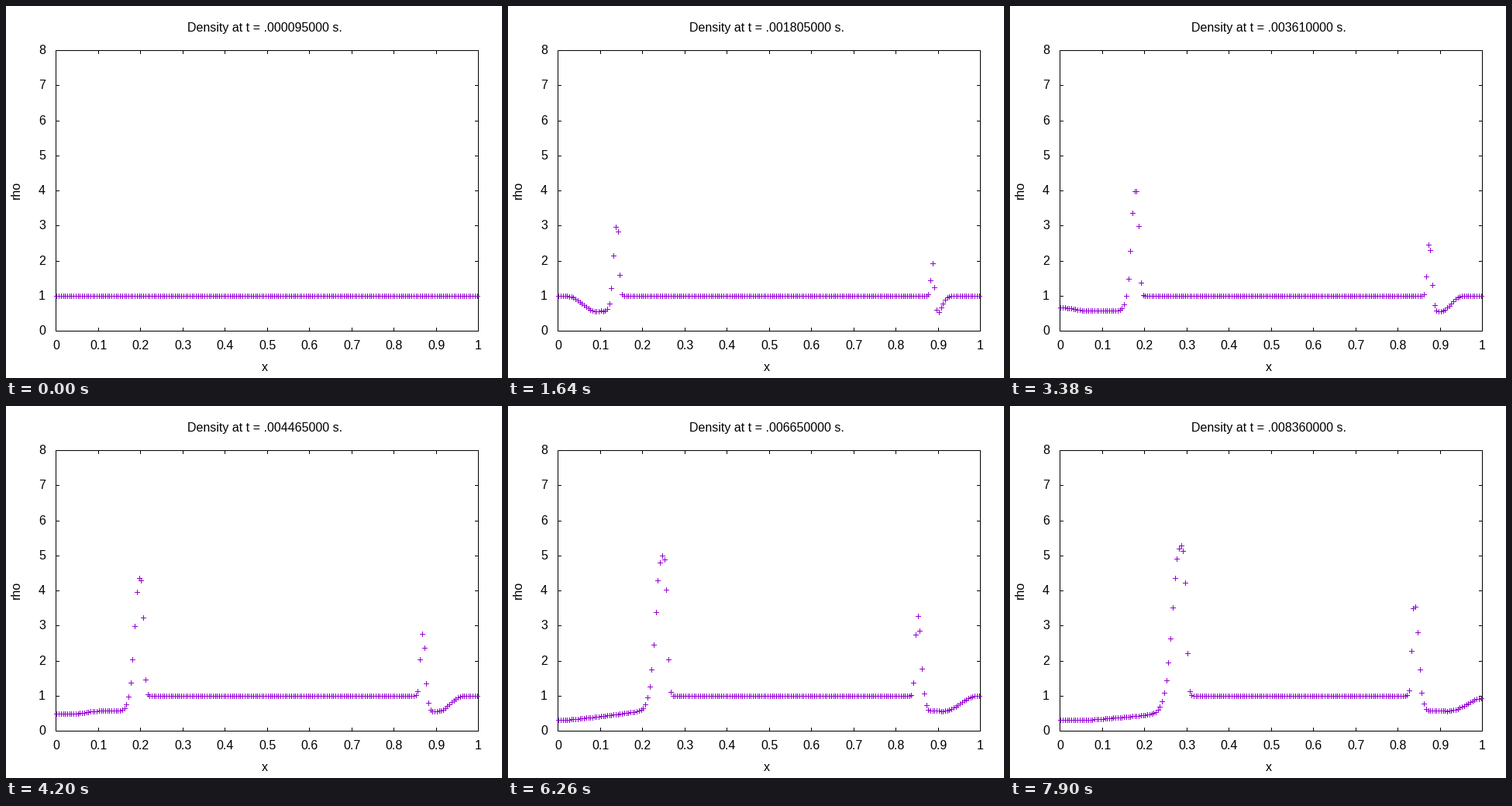
Recreate the animation shown at these times as a matplotlib script. Size 640 by 480 pixels, loop 8000 ms.

```python
import numpy as np
import matplotlib.pyplot as plt
from matplotlib.animation import FuncAnimation
from matplotlib.collections import LineCollection

W, H, DPI = 640, 480, 100
PX = 72 / DPI                       # one pixel in points
LEFT, RIGHT, TOP, BOTTOM = 64, 609, 57, 419
PURPLE = "#9400d3"

# Interacting blast waves: 1D Euler equations between two walls
N, GAMMA = 200, 1.4
DT, SUBSTEPS, STATES = 9.5e-5, 4, 88
DX = 1 / N
X = (np.arange(N) + 0.5) * DX


def conserved(w):
    rho, u, p = w
    return np.array([rho, rho * u, p / (GAMMA - 1) + 0.5 * rho * u * u])


def primitive(q):
    rho, m, e = q
    u = m / rho
    return np.array([rho, u, np.maximum((GAMMA - 1) * (e - 0.5 * m * u), 1e-6)])


def flux(w, q):
    rho, u, p = w
    return np.array([q[1], q[1] * u + p, (q[2] + p) * u])


def minmod(a, b):
    return np.where(a * b > 0, np.sign(a) * np.minimum(abs(a), abs(b)), 0)


def star_flux(w, s, sm):
    """Flux next to the contact wave sm, behind the outer wave s."""
    rho, u, p = w
    q = conserved(w)
    k = rho * (s - u) / (s - sm)
    e = q[2] / rho + (sm - u) * (sm + p / (rho * (s - u)))
    return flux(w, q) + s * (np.array([k, k * sm, k * e]) - q)


def hllc(wl, wr):
    (rl, ul, pl), (rr, ur, pr) = wl, wr
    cl, cr = np.sqrt(GAMMA * pl / rl), np.sqrt(GAMMA * pr / rr)
    sl = np.minimum(ul - cl, ur - cr)
    sr = np.maximum(ul + cl, ur + cr)
    ml, mr = rl * (sl - ul), rr * (sr - ur)
    sm = (pr - pl + ml * ul - mr * ur) / (ml - mr)
    inner = np.where(sm > 0, star_flux(wl, sl, sm), star_flux(wr, sr, sm))
    inner = np.where(sl > 0, flux(wl, conserved(wl)), inner)
    return np.where(sr < 0, flux(wr, conserved(wr)), inner)


def rate(q):
    w = np.pad(primitive(q), ((0, 0), (2, 2)), mode="symmetric")
    w[1, :2] *= -1
    w[1, -2:] *= -1
    d = np.diff(w)
    half = 0.5 * minmod(d[:, :-1], d[:, 1:])
    mid = w[:, 1:-1]
    f = hllc((mid + half)[:, :-1], (mid - half)[:, 1:])
    return -np.diff(f) / DX


def simulate():
    p = np.where(X < 0.1, 1000.0, np.where(X > 0.9, 100.0, 0.01))
    q = conserved(np.array([np.ones(N), np.zeros(N), p]))
    h = DT / SUBSTEPS
    out = [q[0].copy()]
    for _ in range(STATES - 1):
        for _ in range(SUBSTEPS):
            q1 = q + h * rate(q)
            q = 0.5 * (q + q1 + h * rate(q1))
        out.append(q[0].copy())
    return out


density = simulate()

# Every ninth picture is held only briefly
TICK = 20
holds = [1 if k % 9 == 3 else 5 for k in range(STATES)]
schedule = np.repeat(np.arange(STATES), holds)[:8000 // TICK]

fig = plt.figure(figsize=(W / DPI, H / DPI), dpi=DPI, facecolor="white")
ax = fig.add_axes([0, 0, 1, 1])
ax.set_xlim(0, W)
ax.set_ylim(H, 0)
ax.axis("off")


def pixel(v):
    return np.floor(np.asarray(v) + 0.5)


def hline(x0, x1, y):
    return [(x0, y + 0.5), (x1 + 1, y + 0.5)]


def vline(x, y0, y1):
    return [(x + 0.5, y0), (x + 0.5, y1 + 1)]


def lines(segments, color):
    return ax.add_collection(LineCollection(
        segments, colors=color, linewidths=PX, capstyle="butt", snap=False))


def label(x, y, s, ha="center", **kw):
    return ax.text(x, y, s, ha=ha, va="baseline", family="Liberation Sans",
                   fontsize=16 * PX, color="black", **kw)


frame = [hline(LEFT, RIGHT, TOP), hline(LEFT, RIGHT, BOTTOM),
         vline(LEFT, TOP, BOTTOM), vline(RIGHT, TOP, BOTTOM)]
for i in range(11):
    x = pixel(LEFT + (RIGHT - LEFT) * i / 10)
    frame += [vline(x, TOP, TOP + 4), vline(x, BOTTOM - 4, BOTTOM)]
    label(x + 0.5, 443, f"{i / 10:g}")
for i in range(9):
    y = pixel(BOTTOM - (BOTTOM - TOP) * i / 8)
    frame += [hline(LEFT, LEFT + 4, y), hline(RIGHT - 4, RIGHT, y)]
    label(51, y + 5, str(i), ha="right")
lines(frame, "black")
label(333.5, 471, "x")
label(18, 237, "rho", rotation=90, rotation_mode="anchor")
title = label(234, 33, "", ha="left")
marks = lines([], PURPLE)

px = pixel(LEFT + (RIGHT - LEFT) * X)


def draw(i):
    k = schedule[i]
    py = pixel(BOTTOM - (BOTTOM - TOP) / 8 * density[k])
    marks.set_segments([hline(x - 3, x + 3, y) for x, y in zip(px, py)]
                       + [vline(x, y - 3, y + 3) for x, y in zip(px, py)])
    title.set_text(f"Density at t = .{(k + 1) * 95:06d}000 s.")
    return marks, title


anim = FuncAnimation(fig, draw, frames=len(schedule), interval=TICK, repeat=True,
                     repeat_delay=0, blit=False)
plt.show()
```
